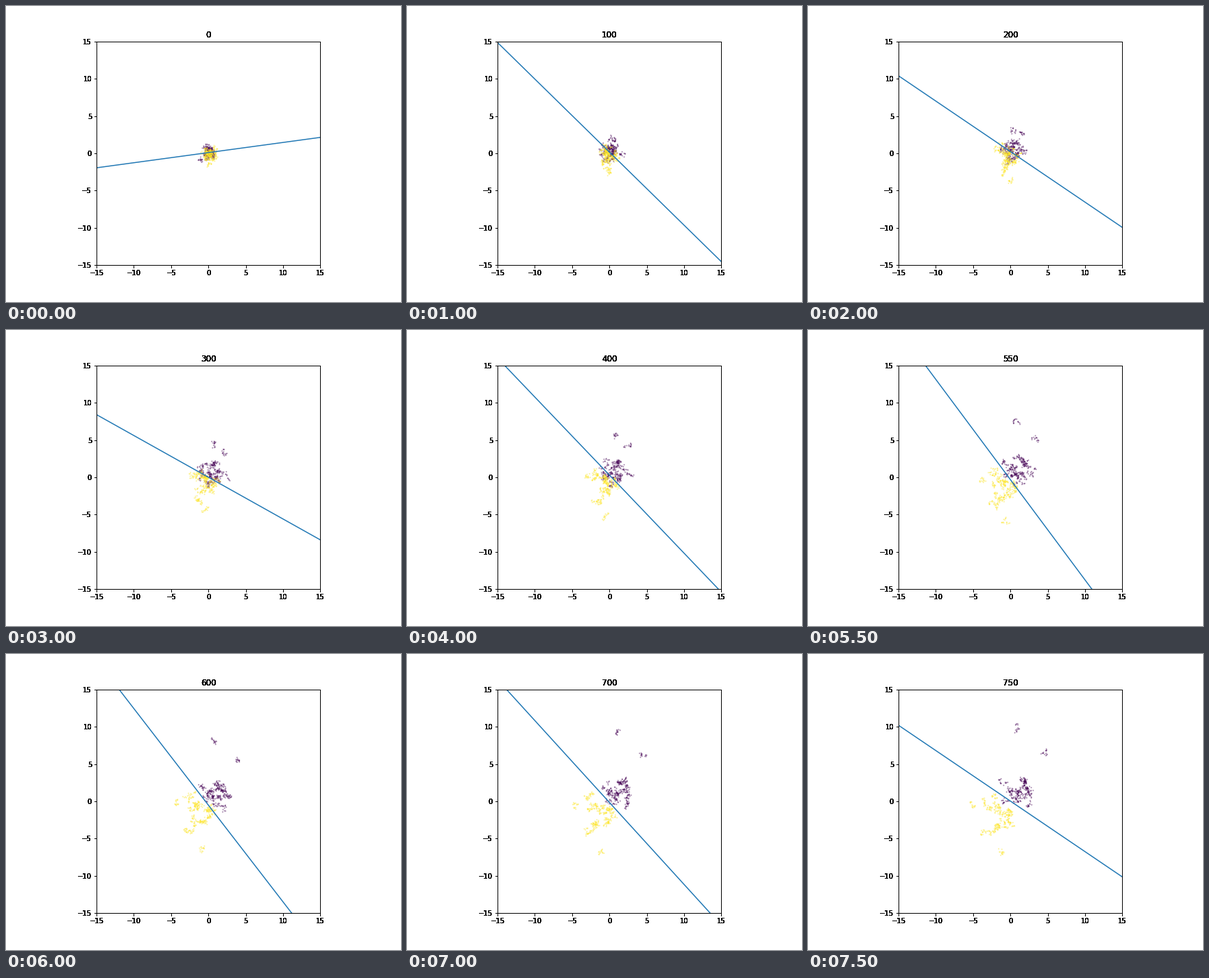
Write a matplotlib script that moves like this. It is 576 px wide and 432 px high and loops after 8000 ms.

```python
import numpy as np
import matplotlib.pyplot as plt
from matplotlib.animation import FuncAnimation

FRAMES, STEP = 16, 50
CLUSTERS, CLUMPS, SPECKS = 20, 3, 5
TEXT_LAYERS = 8  # stacked labels give the heavy, dark lettering

# The line is refitted at every step, so its slope jumps; its offset drifts.
SLOPES = [0.136, -0.68, -0.98, -1.06, -0.678, -0.765, -0.56, -0.69,
          -1.047, -1.66, -1.583, -1.345, -1.297, -1.158, -1.099, -0.678]
OFFSETS = np.interp(range(FRAMES), [0, 4, 6, 8, 12, 15],
                    [0.09, 0.22, 0, 0.29, -0.53, 0.02])

progress = np.linspace(0, 1, FRAMES)[:, None, None]


def drift(mean, spread, seed):
    """Cluster centres (step, cluster, xy): both classes part while spreading out."""
    rng = np.random.default_rng(seed)
    start = rng.normal(0, 0.4, (CLUSTERS, 2))
    reach = rng.normal(0, spread, (CLUSTERS, 2)).clip(-1.8 * spread, 1.8 * spread)
    reach -= reach.mean(axis=0)
    steps = rng.normal(0, 0.12, (FRAMES, CLUSTERS, 2))
    steps[0] = 0
    return (start * (1 - progress) + np.array(mean) * progress
            + reach * progress ** 0.45 + steps.cumsum(axis=0))


def runaway(start, end, power):
    """One cluster that travels far from the rest."""
    return np.array([start]) + (np.array([end]) - start) * progress ** power


purple = np.concatenate([drift((1.5, 1.3), 1.45, 1),
                         runaway((0.2, 0.7), (1, 9.9), 1),
                         runaway((-0.3, 0.6), (4.8, 6.5), 0.8)], axis=1)
yellow = np.concatenate([drift((-1.6, -1.8), 1.3, 2),
                         runaway((0.3, -1.3), (-1.1, -7.1), 0.7)], axis=1)
centres = np.concatenate([purple, yellow], axis=1)
labels = np.repeat([0, 1], [purple.shape[1] * CLUMPS * SPECKS,
                            yellow.shape[1] * CLUMPS * SPECKS])


def cloud(i):
    """Each cluster is a few loose clumps around its centre."""
    rng = np.random.default_rng(100 + i)
    n = centres.shape[1]
    clumps = rng.normal(0, 0.25, (n, CLUMPS, 1, 2))
    specks = rng.normal(0, 0.13, (n, CLUMPS, SPECKS, 2))
    return (centres[i][:, None, None] + clumps + specks).reshape(-1, 2)


fig = plt.figure(figsize=(8, 6), dpi=72)
fig.subplots_adjust(left=0.125, right=0.9, bottom=0.125, top=0.88)
layers = []
for _ in range(TEXT_LAYERS):
    ax = fig.add_subplot()
    ax.set(xlim=(-15, 15), ylim=(-15, 15), aspect="equal")
    ax.set_xticks(range(-15, 16, 5))
    ax.set_yticks(range(-15, 16, 5))
    ax.patch.set_visible(False)
    layers.append(ax)

titles = [ax.set_title("0") for ax in layers]
dots = layers[0].scatter(*cloud(0).T, c=labels, s=1.5, alpha=0.3, cmap="viridis")
line, = layers[0].plot([], [], color="C0", lw=1.5)
xs = np.array([-15, 15])


def update(i):
    dots.set_offsets(cloud(i))
    line.set_data(xs, SLOPES[i] * xs + OFFSETS[i])
    for title in titles:
        title.set_text(str(i * STEP))
    return [dots, line, *titles]


anim = FuncAnimation(fig, update, frames=FRAMES, interval=500,
                     repeat=True, repeat_delay=0, blit=False)
plt.show()
```
